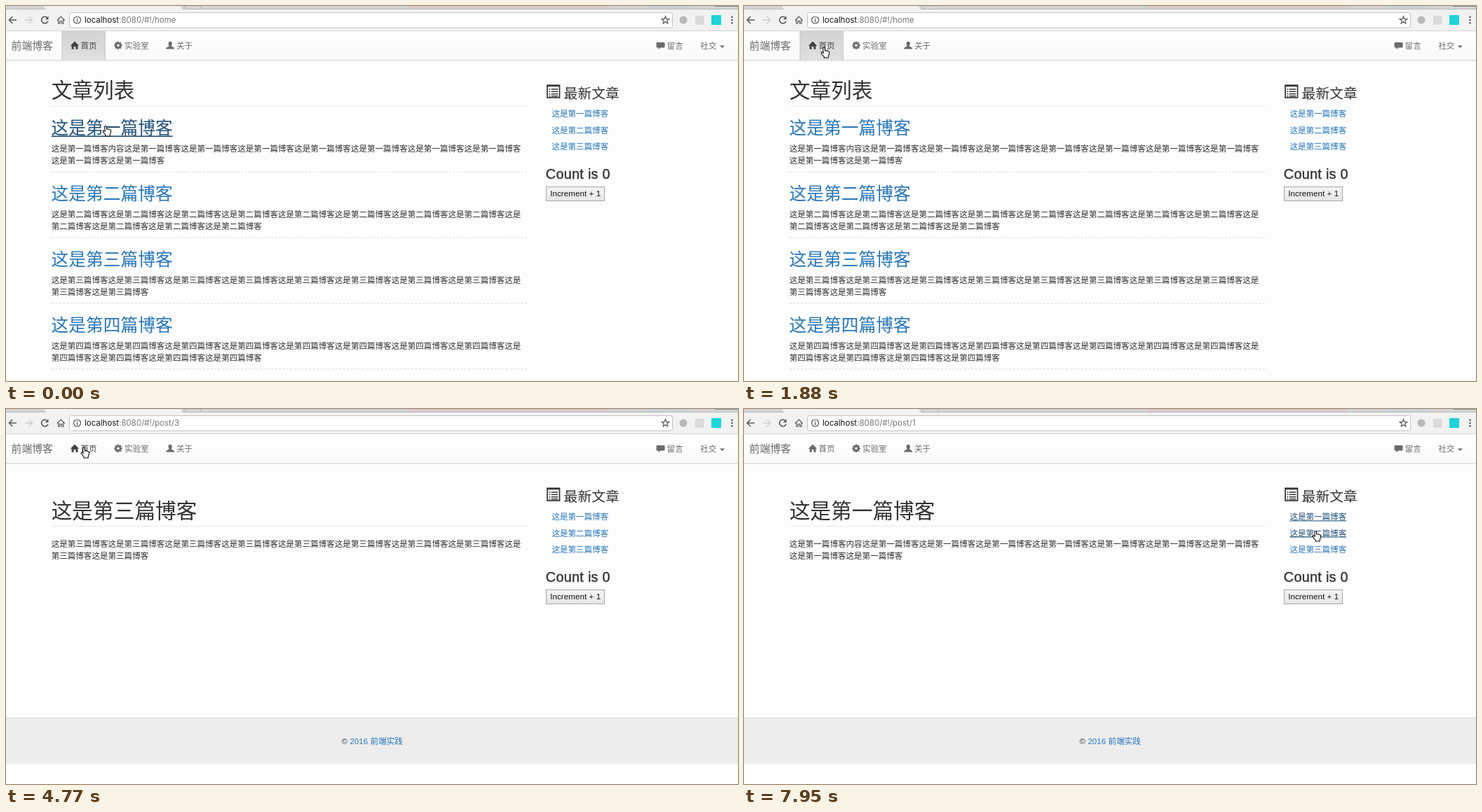
An HTML page for the animation above (8000 ms loop, 1044 by 536 pixels).

```html
<!DOCTYPE html>
<html lang="zh">
<head>
<meta charset="utf-8">
<title>Blog</title>
<style>
html, body { margin: 0; width: 100%; height: 100%; overflow: hidden; background: #fdfdfd; }
svg { display: block; width: 1044px; height: 536px; }
text { font-family: "Liberation Sans", "Noto Sans CJK SC", "Noto Sans CJK", sans-serif; fill: #333; white-space: pre; }
.cjk { font-family: "Noto Sans CJK SC", "Noto Sans CJK", sans-serif; }
.url { font: 11.5px Inter, sans-serif; fill: #777; }
.url .host { fill: #111; }
.nav text, .nav .icon { fill: #6b6b6b; }
.nav .on text, .nav .on .icon { fill: #444; }
.link text { fill: #2877bb; }
.link rect { fill: #23527c; visibility: hidden; }
.link.hover text { fill: #23527c; }
.link.hover rect { visibility: visible; }
.line { fill: none; stroke: #555; stroke-width: 1.5; }
</style>
</head>
<body>
<svg id="stage" viewBox="0 0 1044 536" xmlns="http://www.w3.org/2000/svg"></svg>
<script>
const LOOP = 8000, EM = 11.55, H1 = 29.7, H2 = 24.74, H3 = 19.8;
const stage = document.getElementById('stage');
const $ = id => document.getElementById(id);

// y is the middle of the characters
const cjk = (x, y, size, s) =>
  `<text class="cjk" x="${x}" y="${y + size * .38}" font-size="${size}">${s}</text>`;
const latin = (x, y, size, s, more = '') => `<text x="${x}" y="${y}" font-size="${size}" ${more}>${s}</text>`;
const rect = (x, y, w, h, fill, more = '') =>
  `<rect x="${x}" y="${y}" width="${w}" height="${h}" fill="${fill}" ${more}/>`;
const path = (d, more) => `<path d="${d}" ${more}/>`;
const icon = (x, y, body) => `<g class="icon" transform="translate(${x} ${y})">${body}</g>`;

const name = n => `这是第${' 一二三四'[n]}篇博客`;
function story(n) {
  const all = n === 1 ? name(1) + '内容' + name(1).repeat(9) : name(n).repeat(n === 3 ? 10 : 12);
  return [all.slice(0, 58), all.slice(58)];
}
const paragraph = (n, y) => story(n).map((s, i) => cjk(64.7, y + i * 16.6, EM, s)).join('');
const link = (id, x, y, size, s) => `<g class="link" id="${id}">${cjk(x, y, size, s)}` +
  rect(x, y + size * .46, size * 7, size > 20 ? 1.7 : 1, '') + '</g>';

const gear = Array.from({ length: 8 }, (_, i) =>
  `<rect x="-1.3" y="-5.7" width="2.6" height="3" transform="rotate(${i * 45})"/>`).join('') +
  '<path fill-rule="evenodd" d="M-4.2 0a4.2 4.2 0 1 0 8.4 0a4.2 4.2 0 1 0 -8.4 0M-1.8 0a1.8 1.8 0 1 0 3.6 0a1.8 1.8 0 1 0 -3.6 0"/>';
const house = path('M0-5.8L6.2.4H4.4V5.5H1.4V1.6H-1.4V5.5H-4.4V.4H-6.2Z', '');
const person = path('M0-5.6C2-5.6 2.8-4 2.6-2C2.4-.5 1.8.3 1.6 1.2C3.4 2.2 6 2.6 6 5.3H-6C-6 2.6-3.4 2.2-1.6 1.2C-1.8.3-2.4-.5-2.6-2C-2.8-4-2-5.6 0-5.6Z', '');
const bubble = path('M-4.8-5H4.8Q6-5 6-3.8V1.2Q6 2.4 4.8 2.4H-.2L-3 5.2V2.4H-4.8Q-6 2.4-6 1.2V-3.8Q-6-5-4.8-5Z', '');
const star = 'M' + Array.from({ length: 10 }, (_, i) => {
  const a = i * Math.PI / 5, r = i % 2 ? 2.4 : 5.6;
  return `${(940.5 + r * Math.sin(a)).toFixed(2)} ${(20.3 - r * Math.cos(a)).toFixed(2)}`;
}).join('L') + 'Z';

const browser =
  rect(0, 0, 1044, 36, '#f2f2f2') + rect(0, 0, 1044, 4, '#d3d5d6') + rect(575, 0, 285, 4, '#dccaca') +
  rect(914, 0, 64, 4, '#ccd3d8') + rect(0, 4, 1044, 1, '#bababa') +
  path('M54 0L57 5H252L249 0Z', 'fill="#f2f2f2"') +
  path('M253 0L256 3.5Q257 4.5 259 4.5H276Q279 4 277 0Z', 'fill="#d9d9d9" stroke="#b5b5b5"') +
  rect(1011, 0, 33, 1, '#888') +
  rect(90.5, 9.5, 860, 21.5, '#fff', 'rx="3" stroke="#c3c3c3"') +
  rect(0, 35, 1044, 1, '#d2d2d2') +
  path('M15 20H4.5M9.3 15L4.5 20L9.3 25', 'class="line"') +
  path('M27 20H37.5M32.7 15L37.5 20L32.7 25', 'class="line" style="stroke:#d0d0d0"') +
  path('M59 16.8A4.8 4.8 0 1 0 60 21.5', 'class="line"') + path('M60.5 14.5V19.2H55.8Z', 'fill="#555"') +
  path('M72.8 20.6L78.3 15L83.8 20.6M74.7 19V25H77V21.5H79.6V25H81.9V19', 'class="line" style="stroke-width:1.2"') +
  '<circle cx="101.5" cy="20" r="5" class="line" style="stroke-width:1.2"/>' +
  rect(100.9, 19, 1.3, 4, '#555') + rect(100.9, 16.8, 1.3, 1.3, '#555') +
  `<text class="url" x="112" y="24.2"><tspan class="host">localhost</tspan><tspan id="url"></tspan></text>` +
  path(star, 'class="line" style="stroke-width:1.2"') +
  '<circle cx="966" cy="20" r="5.5" fill="#b9b9b9"/>' +
  rect(983, 14, 12.5, 12.5, '#dadada') + rect(1006, 13, 14, 14, '#1fd3da') +
  [15.7, 20, 24.3].map(y => `<circle cx="1035.5" cy="${y}" r="1.3" fill="#555"/>`).join('');

const nav = '<g class="nav">' +
  rect(0, 36, 1044, 41, 'url(#bar)') + rect(0, 77, 1044, 1, '#e2e2e2') + rect(0, 78, 1044, 1, '#eaeaea') +
  `<g id="active">${rect(79.5, 36, 62.5, 41.5, 'url(#press)')}` +
  rect(79.5, 36, 1.5, 41.5, '#cfcfcf') + rect(140.5, 36, 1.5, 41.5, '#cfcfcf') + '</g>' +
  cjk(7.6, 56.8, 14.84, '前端博客') +
  `<g id="home">${icon(98, 56.3, house)}${cjk(106.4, 57, EM, '首页')}</g>` +
  icon(160, 56.3, gear) + cjk(169, 57, EM, '实验室') +
  icon(234.2, 56.3, person) + cjk(243, 57, EM, '关于') +
  icon(933.6, 57, bubble) + cjk(942.6, 57, EM, '留言') + cjk(990.2, 57, EM, '社交') +
  path('M1018 56.4H1025L1021.5 60Z', 'class="icon"') + '</g>';

const side =
  rect(772, 113.5, 17.5, 17.5, 'none', 'stroke="#333" stroke-width="1.7"') + rect(771.5, 112.6, 18.5, 2.6, '#333') +
  [118.2, 121.6, 125, 128].map(y => rect(774.4, y, 1.8, 1.5, '#333') + rect(777.6, y, 9.6, 1.5, '#333')).join('') +
  cjk(795.6, 124, H3, '最新文章') +
  [1, 2, 3].map(n => link('side' + n, 778.4, 131 + n * 23.1, EM, name(n))).join('') +
  latin(769.8, 247, H3, 'Count is 0', 'letter-spacing=".3" stroke="#333" stroke-width=".4"') +
  rect(770.5, 258.5, 83, 20, 'url(#button)', 'stroke="#a6a6a6"') +
  latin(776.2, 272.2, EM, 'Increment + 1', 'style="fill:#111" letter-spacing=".08"');

const list = '<g id="list">' + cjk(64.7, 119.6, H1, '文章列表') + rect(65, 142.5, 680, 1, '#e9e9e9') +
  [1, 2, 3, 4].map(n => {
    const y = 80 + n * 94;
    return link('title' + n, 64.6, y, H2, name(n)) + paragraph(n, y + 29.6) +
      path(`M65 ${y + 63}H745`, 'stroke="#d6d6d6" stroke-dasharray="3 2.4"');
  }).join('') + '</g>';

const post = n => `<g id="post${n}">` + cjk(64.7, 144.8, H1, name(n)) + rect(65, 167, 679, 1, '#e9e9e9') +
  paragraph(n, 193) + rect(0, 441, 1044, 66, '#ededed') + rect(0, 441, 1044, 1, '#d6d6d6') +
  latin(478.6, 479.2, EM, '©') + `<g class="link">${latin(490.4, 479.2, EM, '2016')}${cjk(519.6, 475, EM, '前端实践')}</g></g>`;

const fade = (id, a, b) => `<linearGradient id="${id}" x2="0" y2="1"><stop stop-color="${a}"/><stop offset="1" stop-color="${b}"/></linearGradient>`;

stage.innerHTML = '<defs>' + fade('bar', '#ffffff', '#f9f9f9') + fade('press', '#d3d3d3', '#e0e0e0') +
  fade('button', '#f3f3f3', '#e6e6e6') + '</defs>' + rect(0, 0, 1044, 536, '#fdfdfd') +
  browser + nav + list + post(1) + post(3) + side + '<g id="cursor">' +
  path('M-1.3 1.2Q0-.8 1.3 1.2L1.6 5Q2.8 4.2 3.8 5.2Q5.2 4.6 5.8 5.8Q7.4 5.6 7.6 7.2L7.4 10L6.2 12.6V15H.2V13.6L-3.2 9.4Q-4.4 7.6-3.2 7Q-2 6.6-.8 8.4Z',
    'id="hand" fill="#fff" stroke="#111" stroke-width="1.1" stroke-linejoin="round"') +
  path('M0 0V12L2.8 9.4L4.8 14L6.8 13.2L4.8 8.8H8.6Z', 'id="arrow" fill="#000" stroke="#fff" paint-order="stroke"') + '</g>';

// time, post shown (0 = list), route
const scenes = [
  [0, 0, 'home'], [150, 0, 'post/1'], [360, 1, 'post/1'], [1880, 0, 'home'], [3250, 0, 'post/3'],
  [3400, 3, 'post/3'], [4920, 0, 'home'], [7180, 0, 'post/1'], [7330, 1, 'post/1']
];
// first step, steps, bend point, end point; each stroke starts where the last ended
const strokes = [
  [0, 1, 142, 171, 142, 171], [360, 1, 140, 172, 140, 172], [810, 7, 365, 150, 112, 59],
  [1880, 1, 114, 59, 114, 59], [2180, 7, 122, 210, 140, 354], [3550, 1, 137, 354, 137, 354],
  [3840, 7, 410, 190, 111, 55], [5070, 1, 110, 54, 110, 54], [5220, 5, 500, 190, 811, 166],
  [5990, 3, 808, 158, 804, 148], [6880, 1, 805, 149, 805, 149], [7480, 1, 810, 164, 810, 164],
  [7660, 1, 816, 176, 816, 176], [7950, 1, 815, 174, 815, 174]
];
const STEP = 153;
const current = (rows, t) => rows.findLastIndex(r => r[0] <= t);

function pointer(t) {
  const i = current(strokes, t), [start, n, cx, cy, x, y] = strokes[i];
  const [, , , , px, py] = strokes[Math.max(0, i - 1)];
  const u = Math.min(n, Math.floor((t - start) / STEP + .03) + 1) / n, v = 1 - u;
  const mix = (a, b, c) => Math.round(v * v * a + 2 * u * v * b + u * u * c);
  return [mix(px, cx, x), mix(py, cy, y)];
}

const show = (id, on) => { $(id).style.display = on ? '' : 'none'; };

function draw(t) {
  const [, page, route] = scenes[current(scenes, t)];
  const [x, y] = pointer(t);
  const near = (left, right, mid, half) => x >= left && x <= right && Math.abs(y - mid) <= half;
  let over = near(80, 142, 57, 20);
  $('url').textContent = ':8080/#!/' + route;
  show('active', !page);
  show('list', !page);
  show('post1', page === 1);
  show('post3', page === 3);
  $('home').classList.toggle('on', !page || over);
  for (let n = 1; n <= 4; n++) {
    const hit = !page && near(64, 238, 80 + n * 94, 13);
    $('title' + n).classList.toggle('hover', hit);
    over = over || hit;
  }
  for (let n = 1; n <= 3; n++) {
    const hit = t >= 6880 && near(778, 859, 131 + n * 23.1, 8);
    $('side' + n).classList.toggle('hover', hit || (n === 1 && t >= 6880));
    over = over || hit;
  }
  const hand = over || (t >= 3400 && t < 3550);
  show('hand', hand);
  show('arrow', !hand);
  $('cursor').setAttribute('transform', `translate(${x} ${y})`);
}

const began = performance.now();
function tick() {
  draw((performance.now() - began) % LOOP);
  requestAnimationFrame(tick);
}
tick();
</script>
</body>
</html>
```
